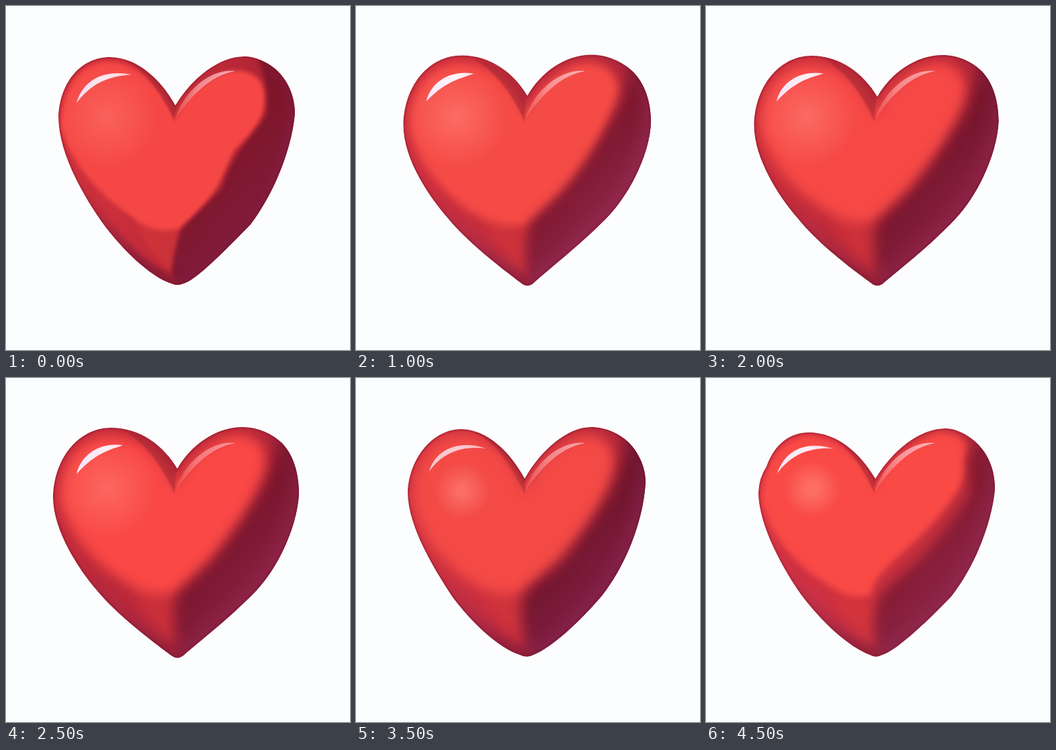
An HTML page for the animation above (5 s loop, 512 by 512 pixels).

```html
<!DOCTYPE html>
<html lang="en">
<head>
<meta charset="utf-8">
<title>Heart</title>
<style>
  html, body { margin: 0; width: 100%; height: 100%; overflow: hidden; background: #fcfdfe; }
  svg { display: block; width: 100vw; height: 100vh; }
  .pose { visibility: hidden; }
  .pose.on { visibility: visible; }
</style>
</head>
<body>
<svg id="stage" viewBox="0 0 512 512"></svg>
<script>
const STEP = 500;
const RIGHT = 'L262 430 L420 390 L470 150 L420 60Z';

// All fields are strings of numbers so that two poses can be averaged.
const carved = {
  edge: 'M252 148 C275 110 315 75 355 75 C370 75 386 82 400 93 C420 110 430 135 430 160 C425 215 398 280 364 325 C327 363 282 409 264 413 Q255 417 246 413 C215 403 173 363 143 322 C110 275 78 215 78 165 C80 115 110 76 155 76 C195 77 230 108 252 148Z',
  face: 'M252 168 C235 128 200 84 152 83 C105 84 82 130 82 180 C95 235 145 285 185 312 C205 328 225 338 258 332 C318 280 315 265 340 215 C370 185 390 165 384 125 C378 98 350 94 330 97 C300 105 265 135 252 168Z',
  shade: 'M372 70 C392 115 391 150 386 165 C360 205 340 215 322 270 C290 305 265 325 260 335 C252 360 248 380 246 400 ' + RIGHT,
  rim: '205 48 60', side: '168 34 50', lit: '245 72 70', dark: '126 22 42', glint: '130 28 62',
  faceBlur: '3', shadeBlur: '3',
  spot: '150 165 75', spotCore: '0', spotAlpha: '.45',
  gloss: 'M105 144 C115 110 145 94 187 102 C150 105 128 115 105 144Z', glossAlpha: '.9', sheen: '.65'
};

const round = {
  ...carved,
  edge: 'M255 132 C275 98 310 72 348 72 C372 72 396 82 414 98 C432 115 443 142 443 172 C443 215 415 275 375 315 C330 357 290 388 264 413 Q255 420 246 413 C215 388 165 350 135 315 C100 275 68 222 68 178 C68 120 105 73 157 73 C200 73 235 98 255 132Z',
  face: 'M252 165 C235 120 205 84 150 84 C105 86 79 130 79 178 C82 215 105 255 140 290 C170 318 205 334 254 332 C330 275 372 210 394 130 C400 100 370 83 342 83 C305 88 265 125 252 165Z',
  shade: 'M404 92 C410 125 402 140 388 160 C360 215 345 235 320 270 C295 295 275 312 265 326 C256 350 256 375 257 400 ' + RIGHT,
  rim: '198 46 62', side: '174 40 60', lit: '247 76 70', dark: '134 24 46', glint: '150 44 84',
  faceBlur: '4', shadeBlur: '7', spotAlpha: '.6',
  gloss: 'M104 143 C112 112 140 95 174 100 C164 108 138 108 104 143Z', glossAlpha: '1', sheen: '.6'
};

const smooth = {
  ...round,
  edge: 'M255 135 C275 100 312 73 352 73 C376 73 396 83 410 97 C427 115 435 142 435 172 C433 218 405 280 370 317 C330 360 290 390 264 412 Q255 420 246 412 C215 390 165 352 137 315 C102 275 73 222 73 178 C74 120 110 74 158 74 C200 74 235 101 255 135Z',
  face: 'M252 163 C235 120 205 85 152 85 C105 88 80 130 80 178 C85 220 125 268 155 288 C185 312 215 328 250 322 C300 285 360 215 382 150 C398 105 370 83 345 83 C305 88 265 125 252 163Z',
  shade: 'M408 80 C402 125 392 150 380 170 C352 215 330 245 308 272 C285 295 265 313 254 326 C250 345 252 375 256 405 ' + RIGHT,
  rim: '205 48 60', side: '180 38 56', lit: '243 74 70', dark: '112 20 40', glint: '142 36 72',
  faceBlur: '9', shadeBlur: '10', spotAlpha: '.65',
  gloss: 'M105 141 C112 112 142 95 176 101 C160 106 136 108 105 141Z', glossAlpha: '.95', sheen: '.75'
};

const glossy = {
  ...smooth,
  edge: 'M255 135 C275 100 312 73 352 73 C376 73 396 83 411 97 C428 115 436 142 436 172 C434 218 407 280 372 317 C330 360 290 390 264 413 Q255 420 246 413 C215 390 165 352 136 317 C102 278 70 222 70 178 C71 120 108 74 156 74 C200 74 235 101 255 135Z',
  rim: '190 42 58', lit: '249 72 70', dark: '118 20 42',
  spotAlpha: '.55', sheen: '.5',
  gloss: 'M105 143 C112 112 142 95 174 100 C160 106 136 108 105 143Z'
};

const worn = {
  ...smooth,
  edge: 'M251 150 C272 112 312 73 350 73 C372 73 392 83 405 95 C422 112 431 134 431 155 C428 212 402 278 366 324 C333 363 290 402 264 412 Q254 417 244 412 C212 402 171 363 143 325 C112 278 77 218 77 170 C79 120 114 76 157 76 C195 77 230 110 251 150Z',
  face: 'M251 166 C235 128 205 86 155 84 C110 86 84 130 84 178 C90 225 125 270 155 292 C185 316 215 328 247 320 C300 280 360 215 380 150 C394 108 370 84 345 84 C305 90 265 130 251 166Z',
  shade: 'M403 85 C398 125 390 150 378 172 C352 215 330 245 308 272 C282 295 260 308 250 324 C244 345 248 375 255 405 ' + RIGHT,
  rim: '207 50 64', dark: '110 20 42', glint: '134 34 74',
  spot: '158 168 42', spotCore: '.15', spotAlpha: '.65',
  gloss: 'M109 139 C118 106 154 91 194 105 C158 101 130 110 109 139Z', glossAlpha: '.75', sheen: '.6'
};

const rough = {
  ...worn,
  edge: 'M248 152 Q285 105 335 71 Q355 68 403 84 Q428 90 433 115 L434 160 L432 184 Q418 224 400 264 Q376 318 345 357 Q315 390 282 408 Q258 422 220 413 L188 378 L138 320 Q120 298 104 267 Q88 235 77 202 L77 160 Q80 130 98 106 Q112 87 130 82 L185 84 Q205 87 222 99 L248 128Z',
  face: 'M248 172 C235 128 205 92 155 94 C115 94 92 130 92 172 C98 208 125 245 154 272 C185 302 210 318 238 306 C292 265 348 200 368 146 C380 108 362 84 340 84 C305 92 262 135 248 172Z',
  shade: 'M402 75 C400 125 388 155 375 182 C354 215 330 248 304 278 C278 303 258 335 249 358 C240 380 236 400 235 425 ' + RIGHT,
  rim: '166 36 52', side: '158 34 52', lit: '236 68 72', dark: '98 18 38', glint: '112 26 62',
  faceBlur: '17', shadeBlur: '13',
  spot: '149 152 41', spotCore: '.94', spotAlpha: '.65',
  gloss: 'M108 137 C120 95 175 85 213 116 C176 94 130 103 108 137Z', glossAlpha: '.3', sheen: '.5'
};

const faceted = {
  ...carved,
  edge: 'M252 150 C275 112 315 75 357 75 C372 75 388 84 400 94 C420 112 430 136 430 165 C426 212 402 278 365 325 C328 364 280 408 262 412 Q253 417 244 412 C212 400 172 363 142 323 C110 278 78 215 78 170 Q79 148 90 132 C102 98 125 81 153 81 C195 81 230 112 252 150Z',
  face: 'M252 163 C238 128 205 90 153 86 C110 88 86 130 82 178 C90 228 130 274 170 300 C195 318 225 334 248 320 C246 290 305 255 345 208 C374 172 392 150 384 120 C400 96 375 80 348 80 C310 90 265 132 252 163Z',
  shade: 'M404 92 C384 130 394 140 392 172 C368 215 345 240 320 268 C290 296 262 315 254 335 C248 360 250 380 255 410 ' + RIGHT,
  rim: '210 50 66', side: '190 46 58', lit: '249 74 70', dark: '130 24 46', glint: '144 40 78',
  faceBlur: '5', shadeBlur: '9',
  spot: '158 165 42', spotCore: '.2', spotAlpha: '.65',
  gloss: 'M106 142 C118 106 150 93 189 105 C156 103 128 112 106 142Z', glossAlpha: '.95', sheen: '.7'
};

function blend(a, b) {
  const between = key => {
    const other = b[key].match(/[\d.]+/g);
    let i = 0;
    return a[key].replace(/[\d.]+/g, n => (+n + +other[i++]) / 2);
  };
  return Object.fromEntries(Object.keys(a).map(key => [key, between(key)]));
}

const poses = [
  carved, round, blend(round, smooth), smooth, blend(smooth, glossy),
  glossy, blend(glossy, worn), worn, rough, faceted
];

const stop = (at, color, alpha = 1) =>
  `<stop offset="${at}" stop-color="${color}" stop-opacity="${alpha}"/>`;
const linear = (id, x1, y1, x2, y2, stops) =>
  `<linearGradient id="${id}" gradientUnits="userSpaceOnUse" x1="${x1}" y1="${y1}" x2="${x2}" y2="${y2}">${stops}</linearGradient>`;
const blur = (id, size) =>
  `<filter id="${id}" filterUnits="userSpaceOnUse" x="0" y="0" width="512" height="512" color-interpolation-filters="sRGB"><feGaussianBlur stdDeviation="${size}"/></filter>`;

function draw(p, i) {
  const id = name => name + i;
  const ref = name => `url(#${id(name)})`;
  const rgb = name => `rgb(${p[name].split(' ').join(',')})`;
  const [cx, cy, r] = p.spot.split(' ');
  return `<g class="pose">
    <defs>
      <clipPath id="${id('clip')}"><path d="${p.edge}"/></clipPath>
      ${blur(id('soft'), p.faceBlur)}${blur(id('fade'), p.shadeBlur)}
      ${linear(id('base'), 180, 200, 400, 260, stop(0, rgb('rim')) + stop(1, rgb('side')))}
      ${linear(id('deep'), 310, 250, 390, 320, stop(0, rgb('dark')) + stop(1, rgb('glint')))}
      ${linear(id('turn'), 300, 110, 400, 230, stop(0, rgb('glint'), 0) + stop(1, rgb('glint'), .75))}
      <radialGradient id="${id('spot')}">
        ${stop(0, '#ff806c')}${stop(p.spotCore, '#ff8076')}${stop(1, '#ff8076', +p.spotCore > .9 ? .8 : 0)}
      </radialGradient>
    </defs>
    <g clip-path="${ref('clip')}">
      <path d="${p.edge}" fill="${ref('base')}"/>
      <path d="M185 300 Q235 335 258 325 L250 402 Q205 365 185 300Z" fill="rgb(222,60,60)" opacity=".45" filter="${ref('fade')}"/>
      <path d="${p.face}" fill="${rgb('lit')}" filter="${ref('soft')}"/>
      <path d="${p.shade}" fill="${ref('deep')}" filter="${ref('fade')}"/>
      <path d="${p.edge}" fill="none" stroke="${ref('turn')}" stroke-width="22" filter="${ref('fade')}"/>
      <path d="M175 78 Q224 88 253 136 L251 172 Q222 106 175 78Z" fill="#9c2430" opacity=".5" filter="url(#crisp)"/>
      <path d="M165 348 Q205 390 255 401 L266 420 H240Z" fill="#8c1c2c" opacity=".45" filter="url(#haze)"/>
      <path d="${p.edge}" fill="none" stroke="${rgb('dark')}" stroke-width="4" opacity=".4" filter="url(#crisp)"/>
      <circle cx="${cx}" cy="${cy}" r="${r}" fill="${ref('spot')}" opacity="${p.spotAlpha}"/>
      <path d="${p.gloss}" fill="url(#shine)" opacity="${p.glossAlpha}"/>
      <path d="M252 168 C264 126 306 92 341 97 C306 103 278 130 252 168Z" fill="url(#streak)" opacity="${p.sheen}"/>
    </g>
  </g>`;
}

const stage = document.getElementById('stage');
stage.innerHTML = `<defs>
  ${blur('haze', 4)}${blur('crisp', 1)}
  ${linear('shine', 105, 142, 190, 102, stop(0, '#f4eaff') + stop(.6, '#fff8ff') + stop(1, '#ffd8e0'))}
  ${linear('streak', 254, 160, 340, 97, stop(0, '#ff8a80', .5) + stop(.45, '#ffb0b4') + stop(1, '#ffe4ee'))}
</defs>` + poses.map(draw).join('');

const groups = [...stage.querySelectorAll('.pose')];
const start = performance.now();
let shown = -1;

function tick() {
  const elapsed = Math.max(0, performance.now() - start);
  const next = Math.floor(elapsed / STEP) % groups.length;
  if (next !== shown) {
    groups.forEach((g, i) => g.classList.toggle('on', i === next));
    shown = next;
  }
  requestAnimationFrame(tick);
}
tick();
</script>
</body>
</html>
```
